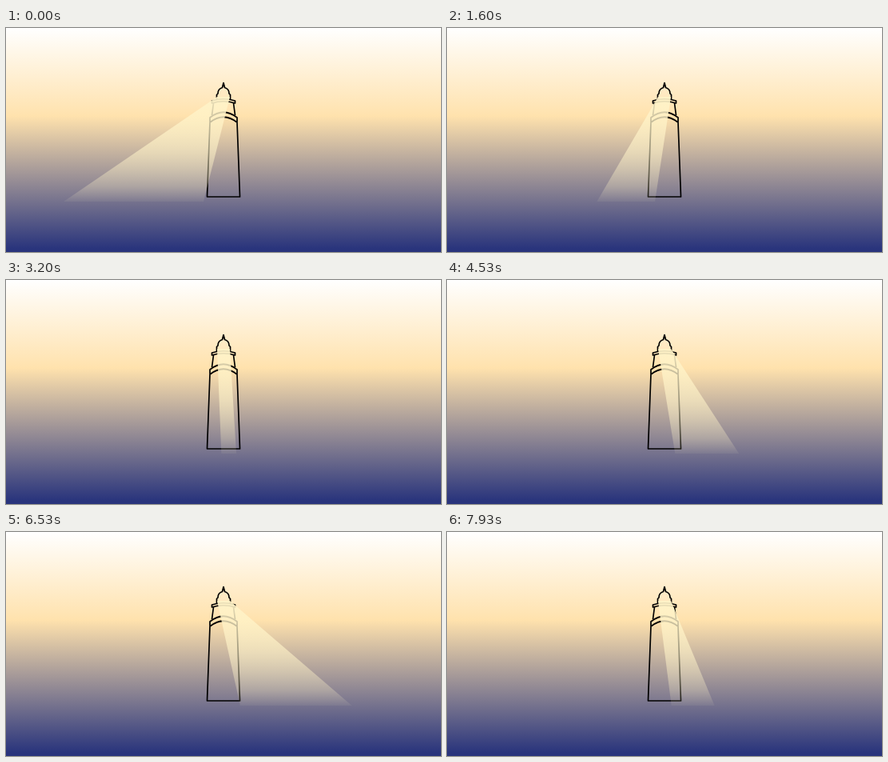
An HTML page without scripts for the animation above (8 s loop, 544 by 280 pixels).

```html
<!DOCTYPE html>
<html lang="en">
<head>
<meta charset="utf-8">
<title>Lighthouse</title>
<style>
  @property --left { syntax: "<length>"; inherits: false; initial-value: 72px; }
  @property --right { syntax: "<length>"; inherits: false; initial-value: 247px; }

  html, body { margin: 0; width: 100%; height: 100%; overflow: hidden; }

  .stage {
    position: relative;
    width: 544px;
    height: 280px;
    overflow: hidden;
    background: linear-gradient(#fff 0, #ffe2ad 110px, #29347c 276px);
  }

  .tower, .beam { position: absolute; inset: 0; }

  .tower {
    fill: none;
    stroke: #000;
    stroke-width: 1.7;
    stroke-linejoin: round;
  }

  /* The lamp stays put; the two lower corners sweep across the water. */
  .beam {
    background: linear-gradient(
      rgb(255 243 200 / .93) 86px,
      rgb(255 243 200 / .62) 150px,
      rgb(255 243 200 / .28) 198px,
      rgb(255 243 200 / .06) 217px);
    clip-path: polygon(264px 86px, 280px 86px, var(--right) 217px, var(--left) 217px);
    animation: sweep 8s linear infinite;
  }

  @keyframes sweep {
    0%     { --left: 72px;  --right: 247px; }
    11.25% { --left: 139px; --right: 254px; }
    18.75% { --left: 181px; --right: 259px; }
    28.75% { --left: 232px; --right: 267px; }
    33.75% { --left: 252px; --right: 272px; }
    37.5%  { --left: 264px; --right: 280px; }
    41.25% { --left: 272px; --right: 292px; }
    46.25% { --left: 277px; --right: 312px; }
    56.25% { --left: 285px; --right: 363px; }
    63.75% { --left: 290px; --right: 405px; }
    75%    { --left: 297px; --right: 472px; }
    86.25% { --left: 290px; --right: 405px; }
    93.75% { --left: 285px; --right: 363px; }
    100%   { --left: 280px; --right: 330px; }
  }
</style>
</head>
<body>
<div class="stage">
  <svg class="tower" width="544" height="280" viewBox="0 0 544 280">
    <!-- dome and spire -->
    <path d="M263.5 89V83.500L265 82Q265 76 270.500 74.500L272 68.500L273.500 74.500Q279 76 279 82L280.500 83.500V89"/>
    <!-- gallery -->
    <path d="M257.500 91Q272 86.500 286.500 91V94Q272 89.500 257.500 94Z"/>
    <!-- lamp room -->
    <path d="M259.500 94L257.500 109M284.500 94L286.500 109"/>
    <!-- band and body -->
    <path d="M255 118V112Q272 98.500 289 112V118Q272 104.500 255 118L251.500 211H292.500L289 118"/>
  </svg>
  <div class="beam"></div>
</div>
</body>
</html>
```
